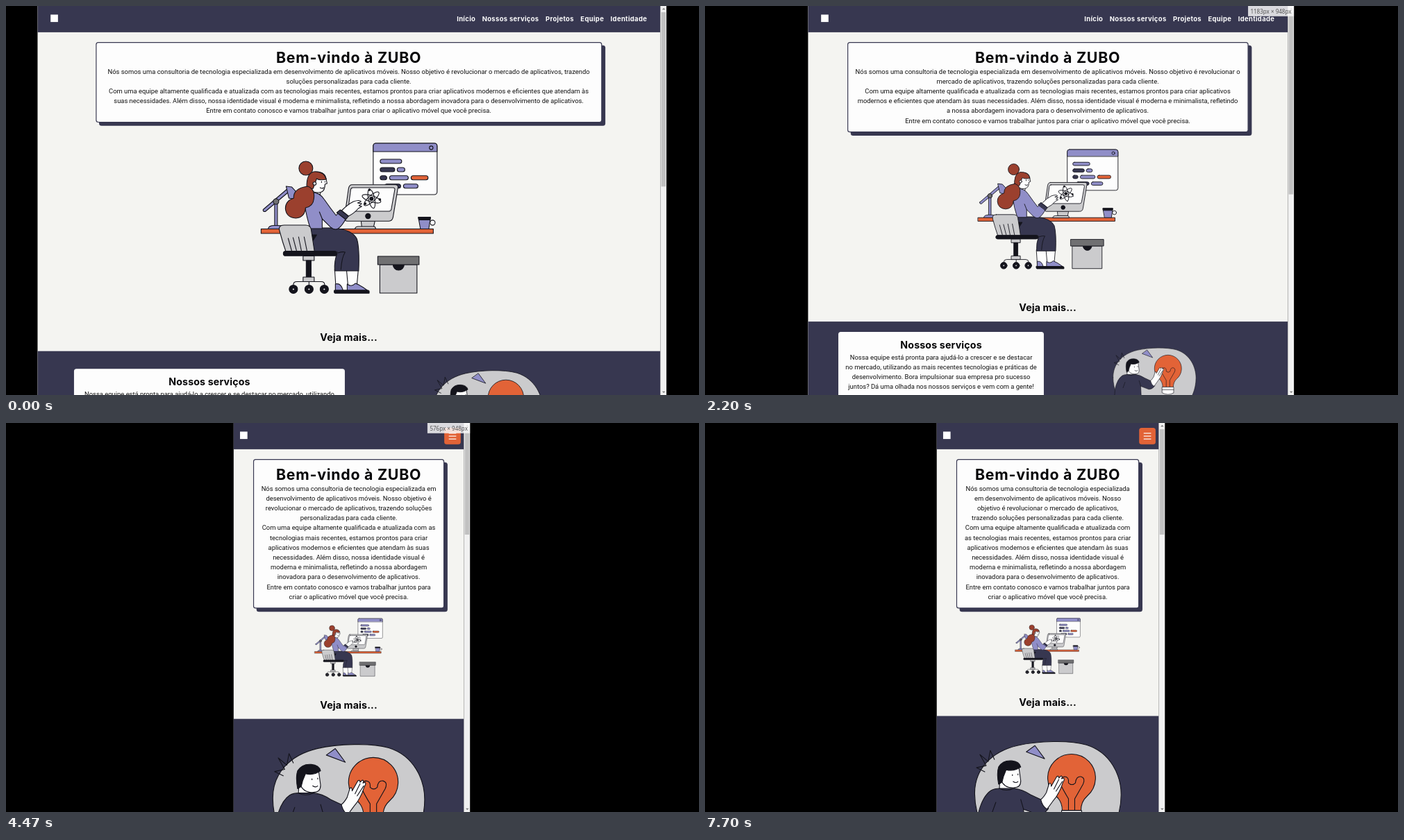
An HTML page that plays this animation: 998 px wide and 561 px high, repeating every 8.81 s.

```html
<!DOCTYPE html>
<html lang="pt-BR">
<head>
<meta charset="utf-8">
<title>Página responsiva</title>
<style>
@property --w { syntax: "<integer>"; inherits: true; initial-value: 1531; }
:root { --dark: #373750; --purple: #908ec8; --orange: #e26337; --ink: #14141c; --gray: #cbcbcd; --loop: 8810ms infinite; }
* { box-sizing: border-box; margin: 0; }
html, body { width: 100%; height: 100%; overflow: hidden; background: #000; }
.stage { position: relative; width: 998px; height: 561px; overflow: hidden; }
.zoom { position: absolute; left: 498.1px; top: 0; transform: scale(.5918); transform-origin: 0 0; }
.view {
  position: absolute; width: calc(var(--w) * 1px); height: 948px; margin-left: calc(var(--w) * -.5px);
  overflow: hidden; container-type: inline-size; animation: resize var(--loop) linear;
  font: 15.9px/24px Roboto, sans-serif; color: #111;
}
@keyframes resize {
  0%, 3.4% { --w: 1531; }
  10.56% { --w: 1516; }
  17.03% { --w: 1443; }
  20.77% { --w: 1369; }
  24.97% { --w: 1183; }
  30.99% { --w: 1021; }
  35.19% { --w: 908; }
  41.2% { --w: 820; }
  50.74% { --w: 576; }
  59%, 100% { --w: 556; }
}
.page { position: absolute; inset: 0 15px 0 0; overflow: hidden; background: #f4f4f1; }
p { position: relative; top: 1.5px; }

header { display: flex; align-items: center; justify-content: space-between; height: 64px; padding: 0 8px 0 16px; background: var(--dark); }
.logo { width: 18px; height: 18px; margin-top: -4px; background: #fff; }
nav { display: none; gap: 16px; margin-top: -2px; color: #fff; font: 700 16px/24px Inter, sans-serif; letter-spacing: .035em; }
.menu { display: grid; place-content: center; gap: 5px; width: 40px; height: 40px; border-radius: 6px; background: var(--orange); }
.menu i { width: 18px; height: 2px; background: #fff; }

main { --bp: 9999px; --c: min(100cqw - 63px, var(--bp)); padding-top: 24px; text-align: center; }
.intro {
  width: calc(var(--c) - 48px); margin: auto; padding: 16px; background: #fdfdfd;
  border: 2px solid var(--dark); border-radius: 6px; box-shadow: 8px 8px 0 var(--dark);
}
h1, h2 { font: 700 36px/40px Inter, sans-serif; letter-spacing: .035em; color: #050507; white-space: nowrap; }
h2 { font-size: 24px; line-height: 32px; letter-spacing: .01em; }
.desk { display: block; width: calc((var(--c) - 32px) * .375); margin: 8px auto 0; aspect-ratio: 1; }
.more { margin: 32px 0 17px; }

section { position: relative; height: 900px; background: var(--dark); }
.row { padding-top: 25px; }
.card { display: none; padding: 16px 16px 78px; border-radius: 6px; background: #fdfdfd; text-align: center; }
.pic { position: relative; height: 300px; }
.pic svg { position: absolute; left: 17%; top: 37px; width: 66%; overflow: visible; }

svg { stroke: var(--ink); stroke-width: 1.1; stroke-linejoin: round; stroke-linecap: round; fill: none; }
.p { fill: var(--purple); } .d { fill: var(--dark); } .o { fill: var(--orange); } .g { fill: var(--gray); }
.w { fill: #fdfdfd; } .k { fill: var(--ink); } .h { fill: #9b402e; } .s { fill: #707072; }

.inspect { animation: inspect var(--loop) step-end; }
@keyframes inspect { 0%, 76.6% { visibility: hidden; } 67% { visibility: visible; } }
.shade { position: absolute; inset: 0; background: rgba(111, 168, 220, .66); border: 1px dashed #8a7fd6; border-width: 1px 1px 0 0; }
.tip {
  position: absolute; left: 0; top: -48px; width: 302px; height: 41px; padding: 7px 10px 0 37px; border-radius: 4px;
  background: #fff; box-shadow: 0 1px 4px #0005; font: 700 12px/14px Roboto, sans-serif; color: #2c2ca8;
}
.tip::after { content: ""; position: absolute; left: 12px; top: 41px; border: 8px solid transparent; border-top-color: #fff; border-bottom: 0; }
.tip b { color: #881280; }
.tip span { position: absolute; right: 9px; top: 14px; font-weight: 400; color: #777; }
.tip svg { position: absolute; left: 10px; top: 14px; width: 16px; stroke: #5b5be0; }

.bar { position: absolute; right: 0; top: 0; width: 15px; height: 100%; background: #f1f1f1; }
.bar i { position: absolute; left: 2px; right: 2px; top: 15px; height: 257px; background: #c1c1c1; }
.bar::before, .bar::after { content: ""; position: absolute; left: 4px; top: 5px; border: 4px solid transparent; border-top: 0; border-bottom-color: #777; }
.bar::after { top: auto; bottom: 5px; transform: scaleY(-1); }
.size {
  position: absolute; right: 0; top: 0; height: 25px; padding: 0 6px; background: rgba(250, 250, 250, .84);
  font: 13.6px/25px "Noto Sans", sans-serif; color: #555; white-space: nowrap; animation: size var(--loop) step-end;
}
.size::before { counter-reset: w var(--w); content: counter(w) "px × 948px"; }
@keyframes size { 0%, 64.7% { visibility: hidden; } 3.9% { visibility: visible; } }

@container (min-width: 640px) { main { --bp: 640px; } header { padding: 0 16px 0 24px; } }
@container (min-width: 768px) {
  main { --bp: 768px; }
  header { padding: 0 24px; }
  nav { display: flex; }
  .menu { display: none; }
  .row { display: grid; grid-template-columns: repeat(2, minmax(0, 1fr)); align-items: center; gap: 19px; padding: 25px calc(4.25cqw + 24.4px) 0; }
  .card { display: block; }
  .pic { height: auto; aspect-ratio: 1 / .356; }
  .pic svg { left: 29.75%; top: 9.4%; width: 40.5%; }
  .bar i { height: 414px; }
}
@container (min-width: 1024px) { main { --bp: 1024px; } header { padding: 0 32px; } .bar i { height: 444px; } }
@container (min-width: 1280px) { main { --bp: 1280px; } .bar i { height: 425px; } }
</style>
</head>
<body>
<div class="stage"><div class="zoom"><div class="view">
  <div class="page">
    <header>
      <div class="logo"></div>
      <nav><span>Início</span><span>Nossos serviços</span><span>Projetos</span><span>Equipe</span><span>Identidade</span></nav>
      <div class="menu"><i></i><i></i><i></i></div>
    </header>
    <main>
      <div class="intro">
        <h1>Bem-vindo à ZUBO</h1>
        <p>Nós somos uma consultoria de tecnologia especializada em desenvolvimento de aplicativos móveis. Nosso objetivo é revolucionar o mercado de aplicativos, trazendo soluções personalizadas para cada cliente.</p>
        <p>Com uma equipe altamente qualificada e atualizada com as tecnologias mais recentes, estamos prontos para criar aplicativos modernos e eficientes que atendam às suas necessidades. Além disso, nossa identidade visual é moderna e minimalista, refletindo a&nbsp;nossa abordagem inovadora&nbsp;para o desenvolvimento de aplicativos.</p>
        <p>Entre em contato conosco e vamos trabalhar juntos para criar o aplicativo móvel que você precisa.</p>
      </div>
      <svg class="desk" viewBox="355 172.8 277 277">
        <!-- window -->
        <rect class="w" x="528.5" y="198" width="92" height="74" rx="4"/>
        <path class="p" d="M528.5 210v-8q0-4 4-4h84q4 0 4 4v8z"/>
        <circle cx="612" cy="204.5" r="2.6"/>
        <g class="p">
          <rect x="538.5" y="221" width="31" height="6" rx="3"/>
          <rect x="563" y="233" width="11" height="6" rx="3"/>
          <rect x="552" y="244.7" width="27" height="6" rx="3"/>
          <rect x="572" y="256.7" width="21" height="6" rx="3"/>
        </g>
        <g class="d">
          <rect x="538.5" y="233" width="21" height="6" rx="3"/>
          <rect x="538.5" y="244.7" width="9.5" height="6" rx="3"/>
          <rect x="545" y="256.7" width="23" height="6" rx="3"/>
        </g>
        <rect class="o" x="583" y="244.7" width="24.5" height="6" rx="3"/>
        <!-- lamp -->
        <rect class="p" x="386.5" y="283" width="4" height="36"/>
        <path class="p" d="M377 321.5q1-5 9-5h5q8 0 9 5z"/>
        <path class="p" d="M370 293.5l35-30 3 3.5-35 29.5q-4 0-3-3z"/>
        <path class="p" d="M403 260l8 1 11 12q-6 7-15 4z"/>
        <circle class="s" cx="388.5" cy="282" r="4"/>
        <!-- desk and monitor -->
        <rect class="o" x="367" y="321.5" width="248" height="6.5"/>
        <path class="p" d="M593.5 305h17.5l-2.5 16.5h-12z"/>
        <path class="k" d="M593.5 304.5h17.5l-.6 4h-16.3z"/>
        <circle class="w" cx="614" cy="312.5" r="3.6"/>
        <path class="g" d="M511 310h20l-2 9h-17z"/>
        <path class="g" d="M502 321.5q1-3.5 5-3.5h22q3 0 3 3.5z"/>
        <path class="g" d="M498 257.7h62q5 0 4 5l-7 42q-1 5.5-6 5.5h-60q-5 0-4-5l6-42q1-5.5 5-5.5z"/>
        <path class="w" d="M499 262h58q3 0 2.5 3l-5 28q-.5 3-3.5 3h-59l4-31q.5-3 3-3z"/>
        <circle class="k" cx="521" cy="303" r="3.6"/>
        <g transform="translate(526 278)">
          <ellipse rx="14" ry="4.5" transform="rotate(18)"/>
          <ellipse rx="14" ry="4.5" transform="rotate(78)"/>
          <ellipse rx="14" ry="4.5" transform="rotate(138)"/>
          <circle class="k" r="2.5"/>
          <circle class="k" cx="12" cy="1" r="1.3"/><circle class="k" cx="-9" cy="7" r="1.3"/><circle class="k" cx="-3" cy="-13" r="1.3"/>
        </g>
        <!-- box -->
        <rect class="g" x="538" y="373" width="53.5" height="41"/>
        <path class="k" d="M557 373a8 8 0 0 0 16 0z"/>
        <rect class="s" x="535" y="361" width="59.5" height="12"/>
        <!-- legs and shoes -->
        <path class="w" d="M473 380h34l-2 22 10 8h-40z"/>
        <path d="M490 380l2 22"/>
        <path class="p" d="M474 410v-9q8-2 11 9zM491 410v-9q6 5 12-1 8 3 17 10z"/>
        <path class="k" d="M472.5 410h48q3 0 2 4.3h-49q-2-1-1-4.3z"/>
        <path class="d" d="M437 320h35q27 3 33 16 4 14 2.5 46h-34.5q-1-14 4-27h-35z"/>
        <path d="M478 356q6-2 10-1q-5 8-6 25"/>
        <path class="k" d="M438 330h9l-5 8z"/>
        <!-- torso, head, hair -->
        <path class="w" d="M438 262h15l-1 10-16 2z"/>
        <path class="w" d="M440 246q2-7 11-6 8 1 9 7l2 9-3 1q0 12-9 12-8 1-12-6z"/>
        <path class="p" d="M438 269q13-1 20 10 9 13 17 23l5-6 10 9q-6 12-12 16-5 3-11-2l-12-12v14h-17q-6-18-8-34z"/>
        <path d="M455 307l-4-10"/>
        <path class="d" d="M476 298l5-4 12 9-4 5z"/>
        <path class="w" d="M483 295q9-9 17-13 9-3 11 0l-5 2 6 1-4 3 4 1-5 3q-6 7-14 11z"/>
        <circle class="h" cx="431.5" cy="234" r="10"/>
        <path class="h" d="M433 266q-2-24 10-27 15-1 18 11-10 2-14-1-3 9-5 14z"/>
        <path class="h" d="M434 260q11 4 9 18-1 11-12 13-1 14-14 15-14-1-15-14 0-11 12-15-1-14 20-17z"/>
        <circle class="w" cx="444" cy="256" r="2.3"/>
        <path d="M454 253v1.5M459 253v1M452 262q3 2 5 0"/>
        <!-- chair -->
        <path class="g" d="M400 316h31q7 0 8 6l5 33h-41q-5-14-9.5-31-2-8 6.500-8z"/>
        <path d="M406 335l5 18M413 334l5 19M421 333l4 20M429 333l4 20"/>
        <rect class="k" x="399" y="353.5" width="77" height="6.8" rx="3.4"/>
        <rect class="g" x="427.5" y="360.5" width="16" height="6.5"/>
        <rect class="k" x="432" y="367" width="7" height="24"/>
        <path d="M413.5 402q0-4.5 5-4.5h35q5 0 5 4.5M436 397v5"/>
        <rect class="g" x="427.5" y="391" width="16" height="6.5"/>
        <g class="k"><circle cx="413.5" cy="408.5" r="6"/><circle cx="436" cy="408.5" r="6"/><circle cx="458" cy="408.5" r="6"/></g>
        <g class="w"><circle cx="413.5" cy="408.5" r="1.6"/><circle cx="436" cy="408.5" r="1.6"/><circle cx="458" cy="408.5" r="1.6"/></g>
      </svg>
      <h2 class="more">Veja mais...</h2>
    </main>
    <section>
      <div class="row">
        <div class="card">
          <h2>Nossos serviços</h2>
          <p>Nossa equipe está pronta para ajudá-lo a crescer e se destacar no&nbsp;mercado, utilizando as mais recentes tecnologias e práticas de desenvolvimento. Bora impulsionar sua empresa pro sucesso juntos? Dá uma olhada nos nossos serviços e vem com a gente!</p>
        </div>
        <div class="pic">
          <svg viewBox="388 459 212 150">
            <path class="g" d="M388.5 535C388 500 412 474 450 465 480 458 525 457 550 464 585 475 600 508 600 536 600 590 560 640 490 640 430 640 389 590 388.5 535z"/>
            <path d="M403 503l-12-6 14-3-9-16 12 10 3-16 6 13"/>
            <path class="p" d="M475.5 465l14 19-26.5-10z"/>
            <!-- bulb -->
            <path class="o" d="M515 559q0-13-9-21a34.5 34.5 0 1 1 45 0q-9 8-9 21z"/>
            <path d="M524 559v-17q-9-15-12-22-2-9 6-10 7 0 6 9 5 5 10 0 1-10 8-9 7 2 3 11l-12 21v17"/>
            <path class="w" d="M514 559h29v15q-14 8-29 0zM514 566h29"/>
            <!-- person -->
            <path class="w" d="M425 512l-1 18h22v-8z"/>
            <path class="w" d="M428 497q15 3 24-3l3 22q0 10-10 10-14 1-19-12z"/>
            <path class="k" d="M423 521q-3-16 0-25 6-10 19-9 11 1 13 9-10 7-21 4l-4 10-2 8z"/>
            <path d="M443 507v1.5M451 506v1.5M444 517q4 3 7 0"/>
            <path class="d" d="M394 562q6-24 18-32 5-3 13-3h20q12 1 24 9l15 7 11 13q-6 9-15 9l-21-8 3 60h-72z"/>
            <path d="M424 527q10 5 21 0M459 557l-4-14M414 561l5-14"/>
            <path class="w" d="M484 543q4-3 8-10l4-13q3-2 3 4l8-14q3-2 3 2l3-3q3 0 1 4l3-1q2 2-1 6-5 17-15 28l-8 11q-7-4-9-14z"/>
            <path d="M510 514l-7 14M515 517l-9 14"/>
          </svg>
        </div>
      </div>
      <div class="inspect shade"></div>
      <div class="inspect tip">
        <svg viewBox="0 0 16 12"><path d="M1 1h14v10H1zM4 4h3v4H4zM10 4h3M10 8h3"/></svg>
        <b>div</b>.bg-darkBlue.flex.flex-c<br>ol.items-center<span>541 × 2567.69</span>
      </div>
    </section>
  </div>
  <div class="bar"><i></i></div>
  <div class="size"></div>
</div></div></div>
</body>
</html>
```
